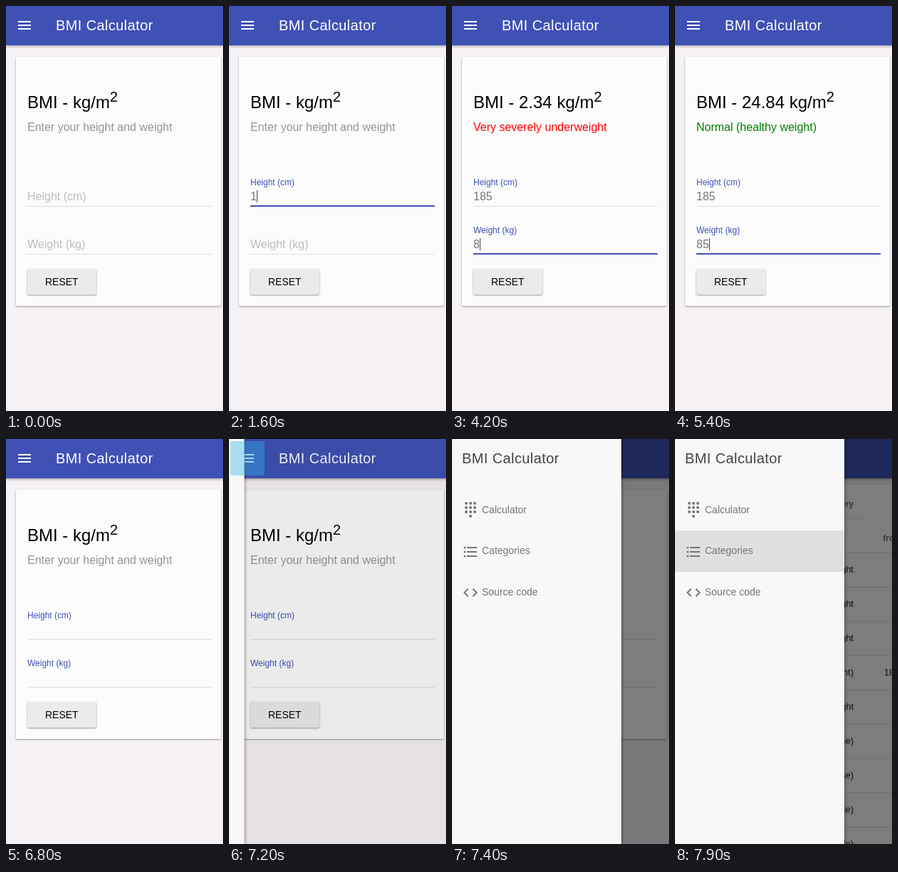
An HTML page for the animation above (8 s loop, 305x567 px).

```html
<!DOCTYPE html>
<html lang="en">
<head>
<meta charset="utf-8">
<title>BMI Calculator</title>
<style>
  html, body { margin: 0; width: 305px; height: 567px; overflow: hidden; background: #f6f1f5; }
  svg { display: block; font-family: "Liberation Sans", Arial, sans-serif; font-size: 16px; }
  .bar { fill: #3f51b5; filter: drop-shadow(0 2px 1.5px rgba(0,0,0,.28)); }
  .title { font-size: 20px; letter-spacing: .02em; }
  .card { fill: #fcfcfc; filter: drop-shadow(0 1px 1px rgba(0,0,0,.38)); }
  .heading { font-size: 24px; }
  .sup { font-size: 20px; }
  .value { fill: #757575; }
  .caret { fill: #444; }

  .field { --float: 0; --line: 0; }
  .label {
    font-size: calc(16px - 4px * var(--float));
    transform: translateY(calc(-21px * var(--float)));
    fill: color-mix(in srgb, #3f51b5 calc(100% * var(--float)), #bdbdbd);
  }
  .line {
    fill: #3f51b5;
    x: calc(146.5px - 116.5px * var(--line));
    width: calc(10px + 249px * var(--line));
    opacity: calc(1000 * var(--line));
  }

  .button { fill: #ebebeb; filter: drop-shadow(0 1px 1px rgba(0,0,0,.4)); }
  .button.down { fill: #dedede; filter: drop-shadow(0 2px 2px rgba(0,0,0,.45)); }
  .reset { font-size: 14px; }

  .table { font-size: 13px; fill: #212121; }
  .table .head { font-size: 12px; font-weight: bold; fill: #757575; }
  .drawer { filter: drop-shadow(1px 0 2px rgba(0,0,0,.4)); }
  .menu { font-size: 14px; fill: #757575; }
</style>
</head>
<body>
<svg width="305" height="567" viewBox="0 0 305 567">
  <rect width="305" height="567" fill="#f6f1f5"/>

  <g id="form">
    <rect class="card" x="14" y="71" width="288" height="349" rx="2"/>
    <text class="heading" x="30" y="143"><tspan id="bmi"></tspan><tspan class="sup" y="134">2</tspan></text>
    <text id="status" x="30" y="175"></text>

    <g class="field" id="height">
      <rect x="30" y="280" width="259" height="1" fill="#dedede"/>
      <rect class="line" y="279" height="2"/>
      <text class="label" x="30" y="272">Height (cm)</text>
      <text class="value" x="30" y="272"></text>
    </g>
    <g class="field" id="weight">
      <rect x="30" y="347" width="259" height="1" fill="#dedede"/>
      <rect class="line" y="346" height="2"/>
      <text class="label" x="30" y="339">Weight (kg)</text>
      <text class="value" x="30" y="339"></text>
    </g>
    <rect class="caret" id="caret" width="1" height="17"/>

    <rect class="button" id="button" x="30" y="368" width="97" height="36" rx="2"/>
    <text class="reset" x="55" y="391">RESET</text>
  </g>

  <g class="table" id="table">
    <rect class="card" y="64" width="305" height="510"/>
    <text class="head" x="251" y="95" text-anchor="end">Category</text>
    <rect y="111" width="268" height="1" fill="#ddd"/>
    <text class="head" x="319" y="143" text-anchor="end">from</text>
  </g>

  <rect class="bar" width="305" height="55"/>
  <path d="M17 21h18v2h-18zm0 5h18v2h-18zm0 5h18v2h-18z" fill="#fff"/>
  <text class="title" x="70" y="34" fill="#fff">BMI Calculator</text>

  <rect id="scrim" width="305" height="567"/>

  <g class="drawer" id="drawer">
    <rect x="-20" width="258" height="567" fill="#f8f8f8"/>
    <rect id="hover" y="128" width="238" height="58" fill="#e0e0e0"/>
    <text class="title" x="14" y="34" fill="#444">BMI Calculator</text>
    <g class="menu">
      <g id="dialpad"></g>
      <text x="42" y="104">Calculator</text>
      <g id="list"></g>
      <text x="42" y="161">Categories</text>
      <path transform="translate(14 203)" d="M9.4 16.6 4.8 12l4.6-4.6L8 6l-6 6 6 6zm5.2 0 4.6-4.6-4.6-4.6L16 6l6 6-6 6z"/>
      <text x="42" y="219">Source code</text>
    </g>
  </g>

  <rect id="tap" x="2" y="3" width="48" height="48" rx="2" fill="#33b5e5"/>
</svg>
<script>
const LOOP = 8000, TICK = 100;
const $ = id => document.getElementById(id);

function add(parent, tag, attrs, text = '') {
  const el = document.createElementNS('http://www.w3.org/2000/svg', tag);
  for (const key in attrs) el.setAttribute(key, attrs[key]);
  el.textContent = text;
  parent.append(el);
}

// Menu icons
for (const y of [90, 96, 102])
  for (const x of [20, 26, 32]) add($('dialpad'), 'circle', { cx: x, cy: y, r: 2 });
add($('dialpad'), 'circle', { cx: 26, cy: 108, r: 2 });
for (const y of [152, 158, 164]) {
  add($('list'), 'circle', { cx: 18, cy: y, r: 1.5 });
  add($('list'), 'rect', { x: 21, y: y - 1, width: 14, height: 2 });
}

// Category rows
[
  ['Very severely underweight', ''],
  ['Severely underweight', '15'],
  ['Underweight', '16'],
  ['Normal (healthy weight)', '18.5'],
  ['Overweight', '25'],
  ['Obese Class I (Moderately obese)', '30'],
  ['Obese Class II (Severely obese)', '35'],
  ['Obese Class III (Very severely obese)', '40'],
  ['Total (all people)', '']
].forEach(([name, from], i) => {
  const y = 159 + 48 * i;
  add($('table'), 'rect', { y, width: 305, height: 1, fill: '#ddd' });
  add($('table'), 'text', { x: 251, y: y + 28, 'text-anchor': 'end' }, name);
  add($('table'), 'text', { x: 319, y: y + 28, 'text-anchor': 'end' }, from);
});

// Each step changes part of the state from its time on
const steps = [
  [0, { focus: '', caret: false, height: '', weight: '', result: false, pressed: false,
        hFloat: 0, hLine: 0, wFloat: 0, wLine: 0, open: 0, tap: 0, page: 'form' }],
  [900, { focus: 'height', caret: true, hFloat: .69, hLine: .69 }],
  [1000, { hFloat: 1, hLine: 1 }],
  [1300, { caret: false }],
  [1600, { caret: true, height: '1' }],
  [1900, { height: '18' }],
  [2100, { height: '185' }],
  [2600, { caret: false }],
  [3100, { caret: true }],
  [3300, { focus: 'weight', hLine: .31, wFloat: .69, wLine: .69 }],
  [3400, { hLine: .01, wFloat: .99, wLine: .99 }],
  [3500, { hLine: 0, wFloat: 1, wLine: 1 }],
  [3700, { caret: false }],
  [4200, { caret: true, weight: '8' }],
  [4400, { weight: '85' }],
  [4900, { caret: false }],
  [5400, { caret: true }],
  [5800, { caret: false }],
  [6300, { caret: true }],
  [6600, { caret: false, wLine: .31, pressed: true }],
  [6700, { height: '', weight: '', wLine: .01 }],
  [6800, { wLine: 0, pressed: false }],
  [7200, { open: .134, tap: .4 }],
  [7300, { open: .92, tap: .17 }],
  [7400, { open: 1, tap: 0 }],
  [7900, { page: 'table' }]
];

function stateAt(time) {
  return Object.assign({}, ...steps.filter(([at]) => at <= time).map(([, change]) => change));
}

function drawField(id, value, float, line) {
  const field = $(id);
  field.style.setProperty('--float', float);
  field.style.setProperty('--line', line);
  field.querySelector('.value').textContent = value;
  field.querySelector('.label').style.visibility = value && !float ? 'hidden' : 'visible';
}

function drawResult(height, weight) {
  const bmi = height && weight ? weight / (height / 100) ** 2 : 0;
  const [text, color] = !bmi ? ['Enter your height and weight', '#959595']
    : bmi < 15 ? ['Very severely underweight', 'red']
    : ['Normal (healthy weight)', 'green'];
  $('bmi').textContent = bmi ? `BMI - ${bmi.toFixed(2)} kg/m` : 'BMI - kg/m';
  $('status').textContent = text;
  $('status').setAttribute('fill', color);
}

function drawCaret(s) {
  const value = s[s.focus] || '';
  const y = (s.focus === 'weight' ? 325 : 258) + (value ? 0 : 1);
  $('caret').setAttribute('x', 30 + 9 * value.length);
  $('caret').setAttribute('y', y);
  show('caret', s.caret);
}

function show(id, on) {
  $(id).style.display = on ? '' : 'none';
}

function draw(time) {
  const s = stateAt(time);
  drawField('height', s.height, s.hFloat, s.hLine);
  drawField('weight', s.weight, s.wFloat, s.wLine);
  drawResult(s.height, s.weight);
  drawCaret(s);
  $('button').classList.toggle('down', s.pressed);
  $('scrim').style.opacity = .5 * s.open;
  $('drawer').setAttribute('transform', `translate(${-250 * (1 - s.open)} 0)`);
  show('drawer', s.open > 0);
  $('tap').style.opacity = s.tap;
  show('form', s.page === 'form');
  show('table', s.page === 'table');
  show('hover', s.page === 'table');
}

const start = performance.now();
let last = -1;
function frame() {
  const time = (performance.now() - start) % LOOP;
  const tick = Math.floor(time / TICK);
  if (tick !== last) draw((last = tick) * TICK);
  requestAnimationFrame(frame);
}
frame();
</script>
</body>
</html>
```
